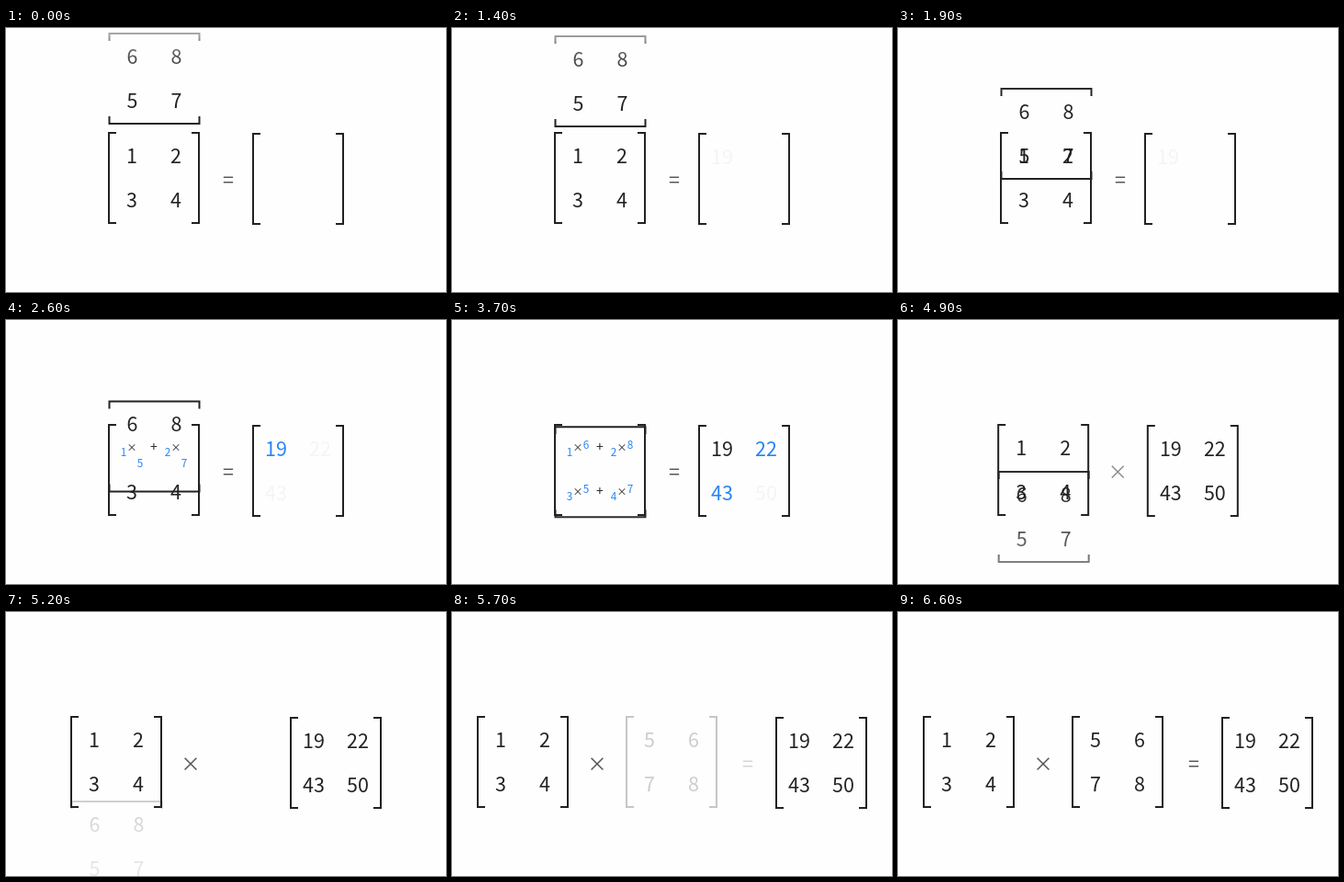
An HTML page that plays this animation: 479x287 px, repeating every 7800 ms.

```html
<!DOCTYPE html>
<html lang="en">
<head>
<meta charset="utf-8">
<title>Matrix multiplication</title>
<style>
  html, body { margin: 0; width: 100%; height: 100%; overflow: hidden; background: #fefefe; }
  svg { display: block; width: 100vw; height: 100vh; }
  text { font: 21.5px "Noto Sans CJK JP", "Noto Sans CJK SC", "Noto Sans CJK", "Noto Sans", sans-serif; text-anchor: middle; fill: #222; }
  path { fill: none; stroke: #222; stroke-width: 2; }
  .small { font-size: 11.8px; fill: #2684f8; }
  .times { font-size: 11px; }
  .plus { font-size: 14px; }
  .op { fill: #555; }
  .hot { fill: #2684f8; }
</style>
</head>
<body>
<svg viewBox="0 0 479 287">
  <defs>
    <linearGradient id="fade" gradientUnits="userSpaceOnUse" x1="0" y1="0" x2="0" y2="287">
      <stop offset="0" stop-color="#fff" stop-opacity=".3"/>
      <stop offset=".11" stop-color="#fff" stop-opacity=".8"/>
      <stop offset=".26" stop-color="#fff"/>
      <stop offset=".72" stop-color="#fff"/>
      <stop offset=".82" stop-color="#fff" stop-opacity=".8"/>
      <stop offset="1" stop-color="#fff" stop-opacity=".45"/>
    </linearGradient>
    <mask id="edges" maskUnits="userSpaceOnUse" x="0" y="0" width="479" height="287">
      <rect width="479" height="287" fill="url(#fade)"/>
    </mask>
  </defs>
</svg>
<script>
const LOOP = 7800, FRAME = 100;
const ROWS = [26, 74], COLS = [26, 74];
const svg = document.querySelector('svg');

// Each slide ends by switching to the next state.
const slides = [
  { start: 1313, length: 600, change: 2000, from: 6, to: 66 },
  { start: 2312, length: 600, change: 3000, from: 66, to: 114 },
  { start: 3618, length: 580, change: 4200, from: 114, to: 162 }
];
const SPREAD = { start: 4806, length: 800, change: 4800 };

const clamp = v => Math.max(0, Math.min(1, v));
const progress = (t, start, length) => clamp((t - start) / length);
const ease = p => (1 - Math.cos(Math.PI * p)) / 2;

function add(parent, tag, attrs = {}, label = '') {
  const node = document.createElementNS(svg.namespaceURI, tag);
  for (const key in attrs) node.setAttribute(key, attrs[key]);
  node.textContent = label;
  parent.append(node);
  return node;
}
const group = (parent, attrs) => add(parent, 'g', attrs);
const move = (node, x, y) => node.setAttribute('transform', `translate(${x} ${y})`);
const show = (node, alpha) => node.setAttribute('opacity', +alpha);
const label = (parent, value, x, y, cls = '') =>
  add(parent, 'text', { x, y, dy: '.367em', class: cls }, value);

function brackets(parent, attrs = {}) {
  add(parent, 'path', { d: 'M9 1H1V99H9M91 1H99V99H91', ...attrs });
}
function matrix(parent, values) {
  brackets(parent);
  return values.map((value, i) => label(parent, value, COLS[i % 2], ROWS[i >> 1]));
}

const left = group(svg);
const leftDigits = matrix(left, [1, 2, 3, 4]);
const leftSmall = [1, 2, 3, 4].map((value, i) =>
  label(left, value, COLS[i % 2] - 9, ROWS[i >> 1] + 5, 'small'));
const signs = ROWS.map(y => {
  const row = group(left);
  COLS.forEach(x => label(row, '×', x, y, 'times'));
  label(row, '+', 50, y - 1, 'plus');
  return row;
});

const turned = group(group(svg, { mask: 'url(#edges)' }));
brackets(turned, { transform: 'translate(0.5 99) rotate(-90) translate(0 0)' });
const turnedDigits = [6, 8, 5, 7].map((value, i) =>
  label(turned, value, COLS[i % 2] + .5, ROWS[i >> 1] - 1));
const turnedSmall = [6, 8, 5, 7].map((value, i) =>
  label(turned, value, COLS[i % 2] + 9, ROWS[i >> 1] - 7, 'small'));

const right = group(svg);
const rightDigits = matrix(right, [5, 6, 7, 8]);
move(right, 189, 113);

const result = group(svg);
const resultDigits = matrix(result, [19, 22, 43, 50]);

const times = label(svg, '×', 0, 0, 'op');
const equals = label(svg, '=', 0, 0, 'op');

// The state in which each product appears.
const shownAt = [1, 2, 2, 3];

function render(t) {
  const done = t >= SPREAD.change;
  const state = slides.filter(s => t >= s.change).length;
  const current = slides.findLast(s => t >= s.start) || slides[0];
  const slide = ease(progress(t, current.start, current.length));
  const moving = state < 3 && t >= slides[state].start;
  const spread = ease(progress(t, SPREAD.start, SPREAD.length));
  const shift = 84 * spread;
  const top = current.from + (current.to - current.from) * slide + 90 * spread;

  move(left, 111 - shift, 113);
  move(turned, 111 - shift, top - 0);
  move(result, 268 + shift, 114);
  show(turned, clamp(1 - 1.62 * spread));

  const rowActive = done ? [false, false] : [state === 1 || state === 2, state >= 2];
  const turnedActive = done ? [false, false] : [state >= 2, state === 1 || state === 2];
  signs.forEach((row, i) => show(row, rowActive[i]));
  for (let i = 0; i < 4; i++) {
    const row = i >> 1;
    show(leftDigits[i], !rowActive[row]);
    show(leftSmall[i], rowActive[row]);
    show(turnedDigits[i], !turnedActive[row]);
    show(turnedSmall[i], turnedActive[row]);
    const visible = state >= shownAt[i];
    const next = moving && shownAt[i] === state + 1;
    show(resultDigits[i], visible ? 1 : next ? .04 : 0);
    resultDigits[i].setAttribute('class', !done && state === shownAt[i] ? 'hot' : '');
  }

  const appear = progress(t, 5500, 800);
  show(right, appear);
  rightDigits.forEach(d => show(d, .88 + .12 * progress(t, 6400, 200)));

  move(times, 242 - shift, 165);
  show(times, progress(t, 4700, 300));
  move(equals, done ? 322 : 242, 165);
  show(equals, done ? appear : 1);
}

function tick() {
  render(Math.floor(performance.now() % LOOP / FRAME) * FRAME);
  requestAnimationFrame(tick);
}
tick();
</script>
</body>
</html>
```
